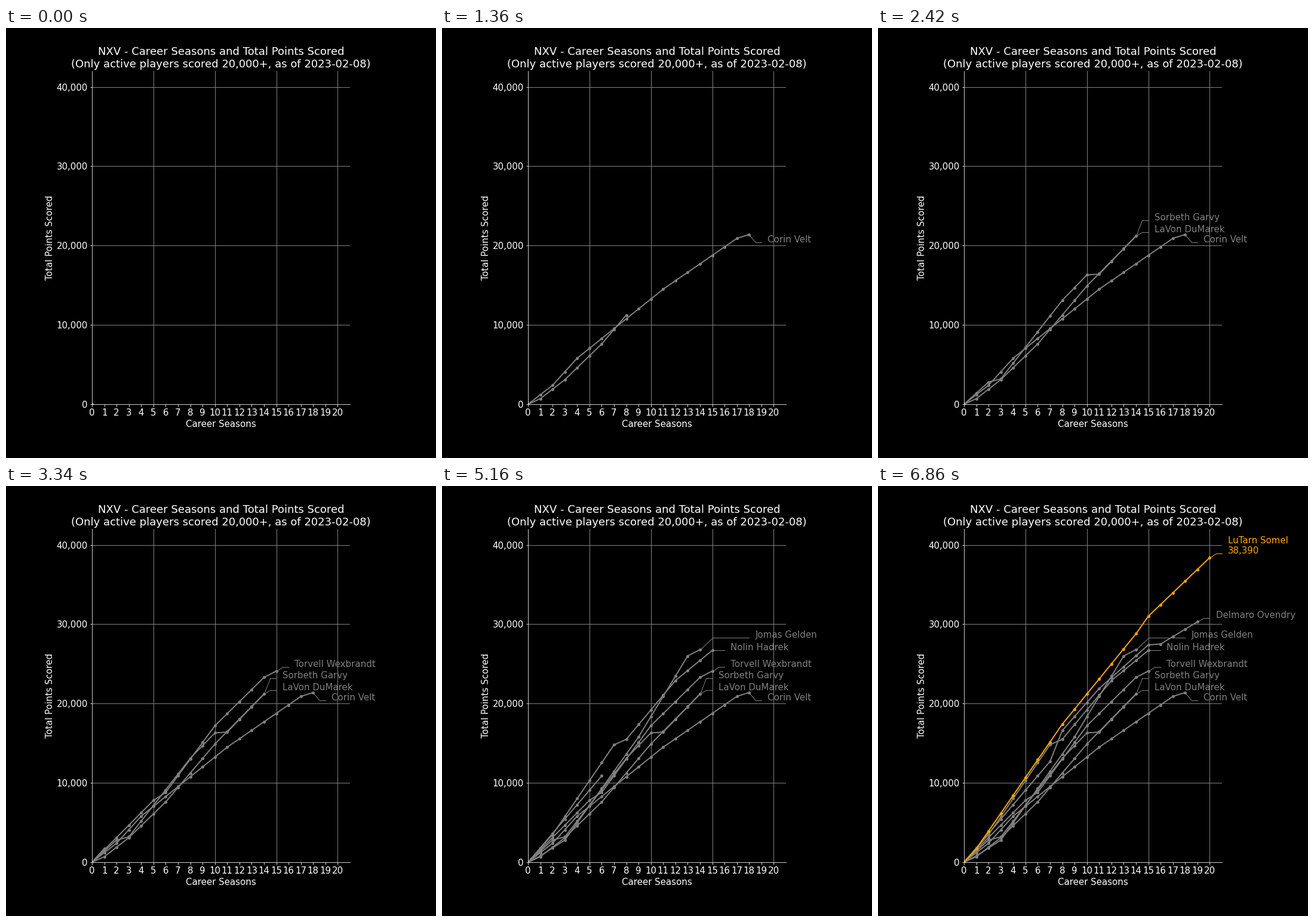
Recreate the animation shown at these times as a matplotlib script. Size 720 by 720 pixels, loop 8.68 s.

```python
import numpy as np
import matplotlib.pyplot as plt
from matplotlib.animation import FuncAnimation

LOOP, INTERVAL = 8680, 20   # ms
STEP = 50                   # ms per season
GRAY, GOLD = "gray", "orange"

# name, label lift, leader length in seasons, turning points of the career
# as (season, total); lifts and totals in thousands of points
PLAYERS = [
    ("Corin Velt", -1, 1,
     [(2, 2.4), (4, 5.8), (11, 14.5), (17, 20.9), (18, 21.4)]),
    ("LaVon DuMarek", 0.5, 1,
     [(1, 0.7), (3, 3.1), (6, 7.6), (10, 14.9), (14, 21.2)]),
    ("Sorbeth Garvy", 2, 1,
     [(2, 2.8), (3, 3.2), (8, 13.1), (10, 16.3), (11, 16.4), (14, 21.2)]),
    ("Torvell Wexbrandt", 0.5, 1,
     [(5, 7.8), (6, 8.8), (10, 17.2), (14, 23.3), (15, 24.1)]),
    ("Nolin Hadrek", 0, 1,
     [(2, 3.5), (7, 14.8), (8, 15.5), (12, 22.9), (15, 26.7)]),
    ("Jomas Gelden", 1.5, 4,
     [(1, 0.8), (3, 2.8), (9, 15.8), (13, 26), (14, 26.8)]),
    ("Delmaro Ovendry", 0.5, 1,
     [(7, 12.7), (8, 16.6), (11, 21.9), (15, 27.4), (16, 27.5), (19, 30.3)]),
    ("LuTarn Somel\n38,390", 0.5, 1,
     [(1, 1.7), (8, 17.4), (14, 28.8), (15, 31), (20, 38.39)]),
]

plt.style.use("dark_background")
plt.rcParams.update({"font.family": "DejaVu Sans", "font.size": 15})

fig, ax = plt.subplots(figsize=(10, 10), dpi=72)
fig.subplots_adjust(left=0.2, right=0.8, bottom=0.125, top=0.9)


def setup_axes():
    ax.set_xlim(0, 21)
    ax.set_ylim(0, 42000)
    ax.set_xticks(range(21))
    ax.set_yticks(range(0, 40001, 10000))
    ax.yaxis.set_major_formatter("{x:,.0f}")
    ax.spines[["top", "right"]].set_visible(False)
    for x in range(5, 21, 5):
        ax.axvline(x, color=GRAY, lw=1, zorder=1)
    for y in range(10000, 40001, 10000):
        ax.axhline(y, color=GRAY, lw=1, zorder=1)
    ax.set_xlabel("Career Seasons")
    ax.set_ylabel("Total Points Scored")
    ax.set_title("NXV - Career Seasons and Total Points Scored\n"
                 "(Only active players scored 20,000+, as of 2023-02-08)")


class Career:
    """A growing line whose name label appears with its last season."""

    def __init__(self, start, color, name, lift, reach, turns):
        self.start = start
        seasons, totals = zip((0, 0), *turns)
        self.n = seasons[-1]
        self.total = 1000 * np.interp(range(self.n + 1), seasons, totals)
        self.line, = ax.plot([], [], color=color, lw=2, marker="o", ms=4)

        y = self.total[-1] + 1000 * lift
        bend, tip = self.n + max(0.5, reach / 4), self.n + reach
        leader, = ax.plot([self.n, bend, tip], [self.total[-1], y, y],
                          color=color, lw=1, clip_on=False, snap=True)
        text = ax.text(tip + 0.5, y, name, color=color, va="baseline")
        self.label = [leader, text]

    def show(self, t):
        season = min((t - self.start) // STEP, self.n)
        count = max(season + 1, 0)
        self.line.set_data(range(count), self.total[:count])
        for part in self.label:
            part.set_visible(season == self.n)


def build_careers():
    careers, start = [], 0
    last = len(PLAYERS) - 1
    for i, player in enumerate(PLAYERS):
        careers.append(Career(start, GOLD if i == last else GRAY, *player))
        pause = 50 if i == last - 1 else 60
        start += careers[-1].n * STEP + pause
    return careers


setup_axes()
careers = build_careers()


def draw(frame):
    t = frame * INTERVAL + INTERVAL // 2
    for career in careers:
        career.show(t)
    return []


anim = FuncAnimation(fig, draw, frames=LOOP // INTERVAL, interval=INTERVAL,
                     init_func=lambda: draw(0), repeat=True, repeat_delay=0)
plt.show()
```
